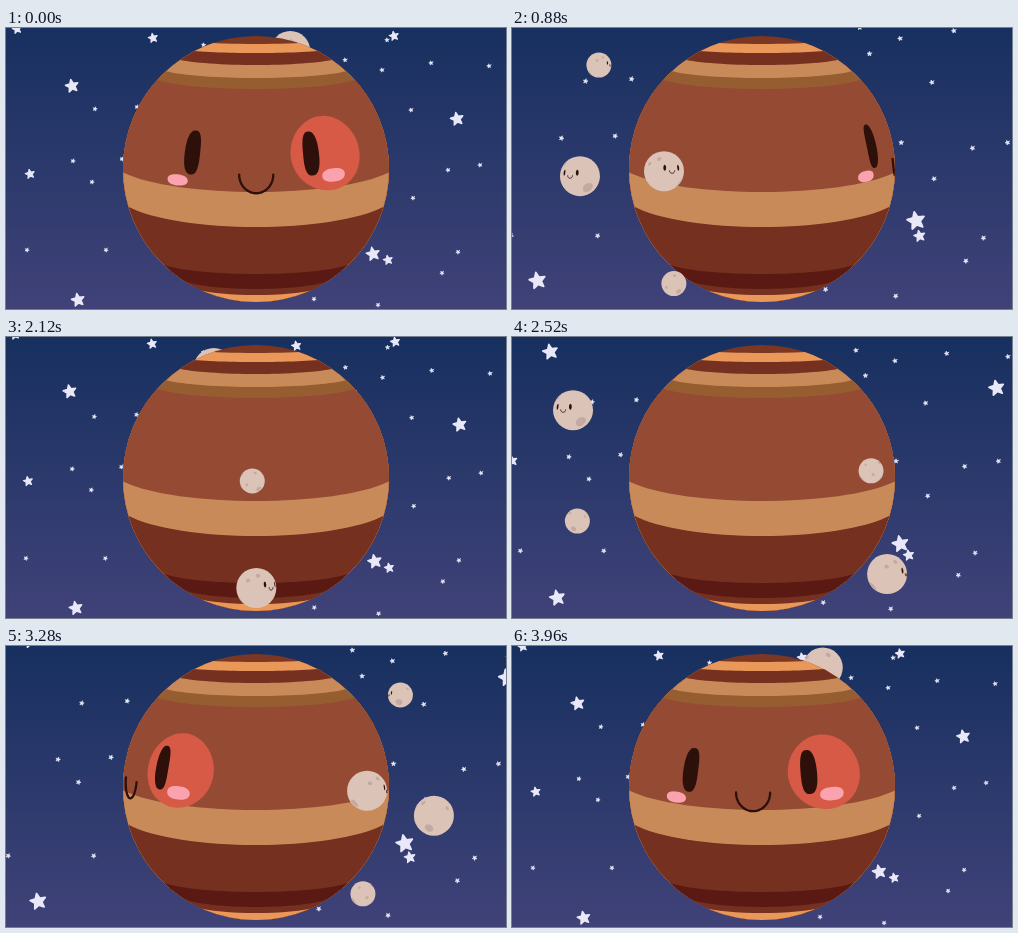
Recreate the animation shown at these times as an HTML page with a canvas. Size 500x281 px, loop 4 s.

```html
<!DOCTYPE html>
<html lang="en">
<head>
<meta charset="utf-8">
<title>Planet and moons</title>
<style>
html, body { margin: 0; width: 100%; height: 100%; overflow: hidden; background: #1a3363; }
canvas { display: block; width: 100vw; height: 100vh; }
</style>
</head>
<body>
<canvas id="stage"></canvas>
<script>
const W = 500, H = 281, LOOP = 4000, TAU = Math.PI * 2, RAD = Math.PI / 180;
const canvas = document.getElementById('stage');
const ctx = canvas.getContext('2d');
const INK = '#2e100b', PINK = '#faa2ae';
const planet = { x: 250, y: 141, r: 133, tilt: 8.2 * RAD };

// ---- sphere drawing ----
function project(globe, lon, lat) {
  const a = lon * RAD, b = lat * RAD, t = globe.tilt;
  let x = Math.cos(b) * Math.sin(a);
  let y = Math.cos(b) * Math.cos(a) * Math.sin(t) - Math.sin(b) * Math.cos(t);
  const z = Math.cos(b) * Math.cos(a) * Math.cos(t) + Math.sin(b) * Math.sin(t);
  if (z < 0) { // push hidden points onto the rim
    const d = Math.hypot(x, y) || 1;
    x /= d;
    y /= d;
  }
  return { x: globe.x + x * globe.r, y: globe.y + y * globe.r, front: z > 0 };
}

function blob(globe, lon, lat, w, h, color, power = 2) {
  const pts = [];
  const bend = v => Math.sign(v) * Math.abs(v) ** (2 / power);
  for (let i = 0; i < 48; i++) {
    const a = TAU * i / 48;
    pts.push(project(globe, lon + w * bend(Math.cos(a)), lat + h * bend(Math.sin(a))));
  }
  if (!pts.some(p => p.front)) return;
  ctx.beginPath();
  pts.forEach(p => ctx.lineTo(p.x, p.y));
  ctx.closePath();
  ctx.fillStyle = color;
  ctx.fill();
}

function smile(globe, lon, lat, w, h, line) {
  ctx.beginPath();
  let pen = false;
  for (let i = 0; i <= 24; i++) {
    const a = Math.PI * i / 24;
    const p = project(globe, lon - w * Math.cos(a), lat - h * Math.sin(a));
    if (p.front) pen ? ctx.lineTo(p.x, p.y) : ctx.moveTo(p.x, p.y);
    pen = p.front;
  }
  ctx.strokeStyle = INK;
  ctx.lineWidth = line;
  ctx.lineCap = ctx.lineJoin = 'round';
  ctx.stroke();
}

// ---- sky ----
// x, y, radius, zoom, vanishing height
const bigStars = [
  [66, 58, 6.6, .27, 345], [451, 91, 6.6, .3, 330], [367, 226, 6.8, .327, 331],
  [72, 272, 6.6, .27, 346], [382, 232, 4.8, .2, 356], [24, 146, 4.8, .19, 355],
  [388, 8, 4.8, .2, 355], [147, 10, 4.8, .2, 355], [290, 12, 4.8, .2, 355], [11, 1, 4.8, .2, 355]
];
const smallStars = [
  [89, 81], [131, 79], [67, 133], [86, 154], [116, 131], [21, 222], [100, 222],
  [308, 271], [372, 277], [436, 245], [452, 224], [407, 170], [442, 142], [474, 137],
  [405, 82], [376, 42], [425, 35], [483, 38], [339, 32], [381, 12], [348, 56],
  [377, 137], [197.5, 17]
];

function star(x, y, r, turn) {
  ctx.beginPath();
  for (let i = 0; i < 10; i++) {
    const a = turn + Math.PI * i / 5 - Math.PI / 2, d = i % 2 ? r * .46 : r;
    ctx.lineTo(x + d * Math.cos(a), y + d * Math.sin(a));
  }
  ctx.closePath();
  ctx.fill();
  ctx.lineWidth = r * .22;
  ctx.stroke();
}

function drawSky(t) {
  const sky = ctx.createLinearGradient(0, 0, 0, H);
  sky.addColorStop(0, '#17305f');
  sky.addColorStop(1, '#404278');
  ctx.fillStyle = sky;
  ctx.fillRect(0, 0, W, H);

  const swing = ((1 - Math.cos(TAU * t / 2000)) / 2) ** .93;
  ctx.fillStyle = ctx.strokeStyle = '#e9e8f8';
  ctx.lineJoin = 'round';
  const place = (x, y, r, zoom, vy, turn) => {
    const s = 1 + zoom * swing;
    star(250 + (x - 250) * s, vy + (y - vy) * s, r * s, turn);
  };
  smallStars.forEach(([x, y], i) => place(x, y, 2.3, .0993, 370, .2 + i * .05));
  bigStars.forEach(([x, y, r, zoom, vy]) => place(x, y, r, zoom, vy, -.2));
}

// ---- planet ----
// half width, rim height, middle height, colour of everything below
const bands = [
  [56, 14, 16, '#e9985a'], [72, 22, 25, '#75301f'], [80, 31, 37, '#c98a5a'],
  [91, 43, 50, '#955d30'], [99, 52, 61, '#944a33'], [134, 144, 164, '#c98a5a'],
  [129, 178, 199, '#75301f'], [92, 237, 246, '#5a1a13'], [73, 253, 261, '#75301f'],
  [60, 261, 267, '#e9985a']
];

function drawPlanet(t) {
  const { x, y, r } = planet;
  ctx.save();
  ctx.beginPath();
  ctx.arc(x, y, r, 0, TAU);
  ctx.clip();
  ctx.fillStyle = '#7c3722';
  ctx.fillRect(x - r, y - r, 2 * r, 2 * r);
  for (const [half, rim, mid, color] of bands) {
    const low = rim + (mid - rim) * 4 / 3;
    ctx.beginPath();
    ctx.moveTo(0, rim);
    ctx.lineTo(x - half, rim);
    ctx.bezierCurveTo(x - half * .6, low, x + half * .6, low, x + half, rim);
    ctx.lineTo(W, rim);
    ctx.lineTo(W, H);
    ctx.lineTo(0, H);
    ctx.fillStyle = color;
    ctx.fill();
  }
  const spin = .1 * (t < LOOP / 2 ? t : t - LOOP);
  blob(planet, spin + 34.1, 14, 18.7, 16.4, '#d65a45');
  blob(planet, spin - 29.7, 14.4, 3.9, 9.6, INK, 2.6);
  blob(planet, spin + 25.2, 14.2, 3.9, 9.6, INK, 2.6);
  blob(planet, spin - 36.4, 1.9, 5.4, 2.4, PINK, 2.3);
  blob(planet, spin + 35.9, 4.1, 6, 2.9, PINK, 2.3);
  smile(planet, spin, 5.7, 7.4, 8, 2.3);
  ctx.restore();
}

// ---- moons ----
// path: [time, x, y]; the face turns at a steady rate from its angle at 880 ms
const moons = [
  { r: 12.5, period: 4000, sway: 0, face: 66, rate: .094, path: [
    [0, 245, 24], [440, 157, 25], [880, 87, 37], [1600, 124, 127],
    [2120, 246, 144], [2880, 419, 103], [3640, 321, 22]] },
  { r: 20, period: 4000, sway: 0, face: -30, rate: .063, path: [
    [880, 68, 148], [1600, 115, 235], [2120, 250, 251], [2880, 444, 211], [3640, 339, 129]] },
  { r: 12.5, period: 2000, sway: 3, face: 170, rate: .15, path: [
    [120, 203, 135], [460, 70, 174], [880, 160, 255], [1240, 341, 255], [1620, 415, 163.5]] },
  { r: 20, period: 2000, sway: 12, face: 24, rate: .15, path: [
    [120, 207, 31], [460, 66, 66], [880, 146, 141], [1240, 345, 150], [1620, 451.5, 55]] }
];
// longitude from the face, latitude, size
const craters = [
  [60, -37, 17], [-42, 38, 7], [220, -40, 14], [195, 40, 8], [150, -18, 7], [-75, 22, 6], [110, 30, 6]
];

// smooth closed curve through an odd number of timed points
function along({ path, period }, t) {
  let x = 0, y = 0;
  const half = d => Math.sin(Math.PI * d / period);
  for (const [tk, xk, yk] of path) {
    let w = 1;
    for (const [tj] of path) if (tj !== tk) w *= half(t - tj) / half(tk - tj);
    x += w * xk;
    y += w * yk;
  }
  return { x, y };
}

function moonState(moon, t) {
  const u = t + moon.sway * Math.sin(TAU * t / LOOP);
  const pos = along(moon, u);
  const front = along(moon, u + 5).x > along(moon, u - 5).x;
  const lon = moon.face + moon.rate * (t % moon.period - 880);
  return { ...pos, r: moon.r, tilt: 0, front, lon };
}

function drawMoon(m) {
  ctx.beginPath();
  ctx.arc(m.x, m.y, m.r, 0, TAU);
  ctx.fillStyle = '#dcc3b7';
  ctx.fill();
  for (const [lon, lat, size] of craters) {
    blob(m, m.lon + lon, lat, size * 1.15, size, '#c2aaa3');
  }
  blob(m, m.lon - 22, 10, 4, 8.5, INK);
  blob(m, m.lon + 22, 10, 4, 8.5, INK);
  smile(m, m.lon, 1, 8, 7, m.r * .045);
}

// ---- loop ----
function draw(now) {
  const t = now % LOOP;
  const ratio = window.devicePixelRatio || 1;
  const w = Math.round(innerWidth * ratio), h = Math.round(innerHeight * ratio);
  if (canvas.width !== w || canvas.height !== h) {
    canvas.width = w;
    canvas.height = h;
  }
  ctx.setTransform(w / W, 0, 0, h / H, 0, 0);
  const states = moons.map(m => moonState(m, t));
  drawSky(t);
  states.filter(m => !m.front).forEach(drawMoon);
  drawPlanet(t);
  states.filter(m => m.front).forEach(drawMoon);
}

const start = performance.now();
function tick() {
  draw(performance.now() - start);
  requestAnimationFrame(tick);
}
tick();
</script>
</body>
</html>
```
